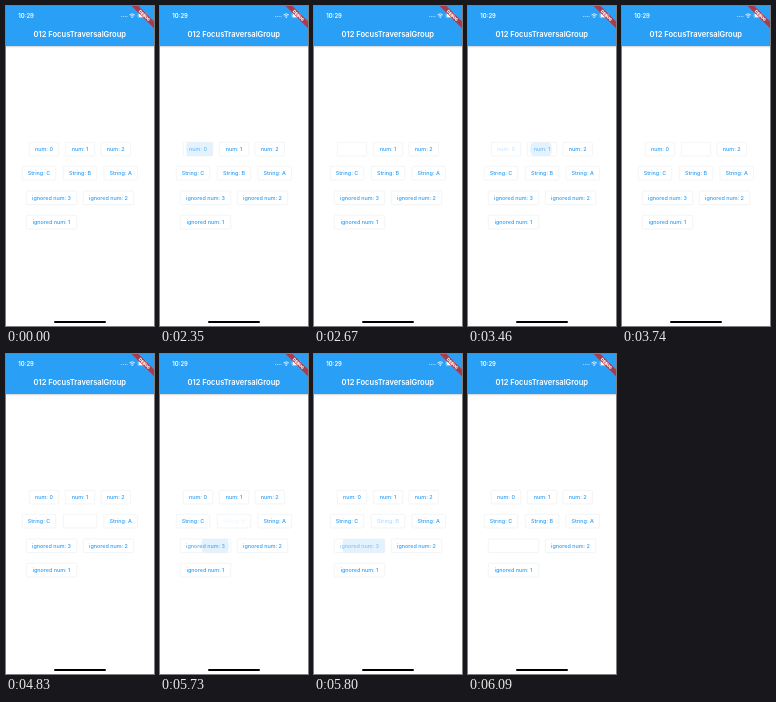
Animation of 148x320 px, one loop 6.13 s. Source, as an HTML page:

```html
<!DOCTYPE html>
<html lang="en">
<head>
<meta charset="utf-8">
<title>Focus traversal</title>
<style>
html, body { margin: 0; width: 100%; height: 100%; overflow: hidden; background: #fff; }
svg { display: block; width: 148px; height: 320px; }
text { font-family: Inter, Roboto, sans-serif; font-weight: 500; text-anchor: middle; }
.bold { font-weight: 600; }
.label { font-size: 5.4px; fill: #2a9df5; }
.edge { fill: none; stroke: #e6e8ea; stroke-width: .5; }
</style>
</head>
<body>
<svg viewBox="0 0 148 320">
  <defs>
    <linearGradient id="shade" x2="0" y2="1">
      <stop stop-color="#000" stop-opacity=".18"/>
      <stop offset="1" stop-color="#000" stop-opacity="0"/>
    </linearGradient>
  </defs>
  <rect width="148" height="320" fill="#fff"/>
  <rect y="40" width="148" height="2" fill="url(#shade)"/>
  <rect width="148" height="40" fill="#2a9ff6"/>
  <g fill="#fff">
    <text x="20" y="11.6" font-size="5.9" class="bold">10:29</text>
    <text x="73.8" y="31.2" font-size="7.55" class="bold">012 FocusTraversalGroup</text>
    <g fill-opacity=".75">
      <circle cx="115.6" cy="10.5" r=".5"/>
      <circle cx="117.4" cy="10.5" r=".5"/>
      <circle cx="119.2" cy="10.5" r=".5"/>
      <circle cx="121" cy="10.5" r=".5"/>
    </g>
    <path d="M123.5 8.9Q126.2 6.6 128.9 8.9M124.6 10.1Q126.2 8.8 127.8 10.1" fill="none" stroke="#fff" stroke-width=".8"/>
    <circle cx="126.2" cy="11.2" r=".7"/>
    <rect x="132" y="7.4" width="8.6" height="4.2" rx="1.1" fill="none" stroke="#fff" stroke-width=".4"/>
    <rect x="132.7" y="8.1" width="7.2" height="2.8" rx=".6"/>
  </g>
  <g transform="translate(148 0) rotate(45)">
    <rect x="-16" y="11" width="32" height="4.8" fill="#bd2a30" fill-opacity=".85"/>
    <text y="14.9" font-size="4" fill="#fff" style="font-weight:900">DEBUG</text>
  </g>
  <g id="buttons"></g>
  <rect x="48" y="315" width="52" height="2" rx="1" fill="#000"/>
</svg>
<script>
const LOOP = 6130, FADE = 220;
const buttons = [
  ['num: 0', 23, 136, 30], ['num: 1', 59, 136, 30], ['num: 2', 94.7, 136, 30],
  ['String: C', 16, 160, 34], ['String: B', 57, 160, 34], ['String: A', 97.7, 160, 34],
  ['ignored num: 3', 20, 184.7, 51], ['ignored num: 2', 77, 184.7, 51],
  ['ignored num: 1', 20, 209, 51]
].map(makeButton);

// Each tap: button, fade start, ripple centre and first radius, screen update times
const taps = [
  { id: 0, from: 2240, x: 43, r: 17, steps: [2350, 2430, 2510, 2590, 2670] },
  { id: 1, from: 3350, x: 73, r: 11, steps: [3460, 3530, 3600, 3670, 3740] },
  { id: 4, from: 4440, x: 71, r: 10, steps: [4540, 4620, 4690, 4830] },
  { id: 6, from: 5670, x: 55, r: 14, steps: [5730, 5800, 5880, 5950, 6020, 6090] }
];

function add(parent, tag, attrs) {
  const el = document.createElementNS('http://www.w3.org/2000/svg', tag);
  for (const key in attrs) el.setAttribute(key, attrs[key]);
  return parent.appendChild(el);
}

function makeButton([name, x, y, width], i) {
  const root = document.getElementById('buttons');
  const box = { x: x + .25, y: y + .25, width: width - .5, height: 13.7, rx: 1.3 };
  add(add(root, 'clipPath', { id: 'clip' + i }), 'rect', box);
  const ripple = add(add(root, 'g', { 'clip-path': `url(#clip${i})` }),
    'circle', { cy: y + 7, r: 0, fill: '#2196f3' });
  add(root, 'rect', { ...box, class: 'edge' });
  const label = add(root, 'text', { x: x + width / 2, y: y + 8.9, class: 'label' });
  label.textContent = name;
  return { label, ripple };
}

function draw(now) {
  const t = now % LOOP;
  for (const { label, ripple } of buttons) {
    label.setAttribute('opacity', 1);
    ripple.setAttribute('opacity', 0);
  }
  const n = taps.findLastIndex(tap => t >= tap.steps[0]);
  if (n >= 0) {
    const { id, from, x, r, steps } = taps[n];
    const shown = steps.findLast(s => s <= t);
    const fade = Math.min(1, (shown - from) / FADE);
    const age = shown - steps[0], life = steps.at(-1) - steps[0];
    const { label, ripple } = buttons[id];
    label.setAttribute('opacity', 1 - fade ** 1.5);
    ripple.setAttribute('cx', x);
    ripple.setAttribute('r', r + age * .18);
    ripple.setAttribute('opacity', .12 * Math.min(1, 1.25 * (1 - age / life)));
    if (n) buttons[taps[n - 1].id].label.setAttribute('opacity', fade * fade);
  }
}

const start = performance.now();
function tick() {
  draw(performance.now() - start);
  requestAnimationFrame(tick);
}
tick();
</script>
</body>
</html>
```
